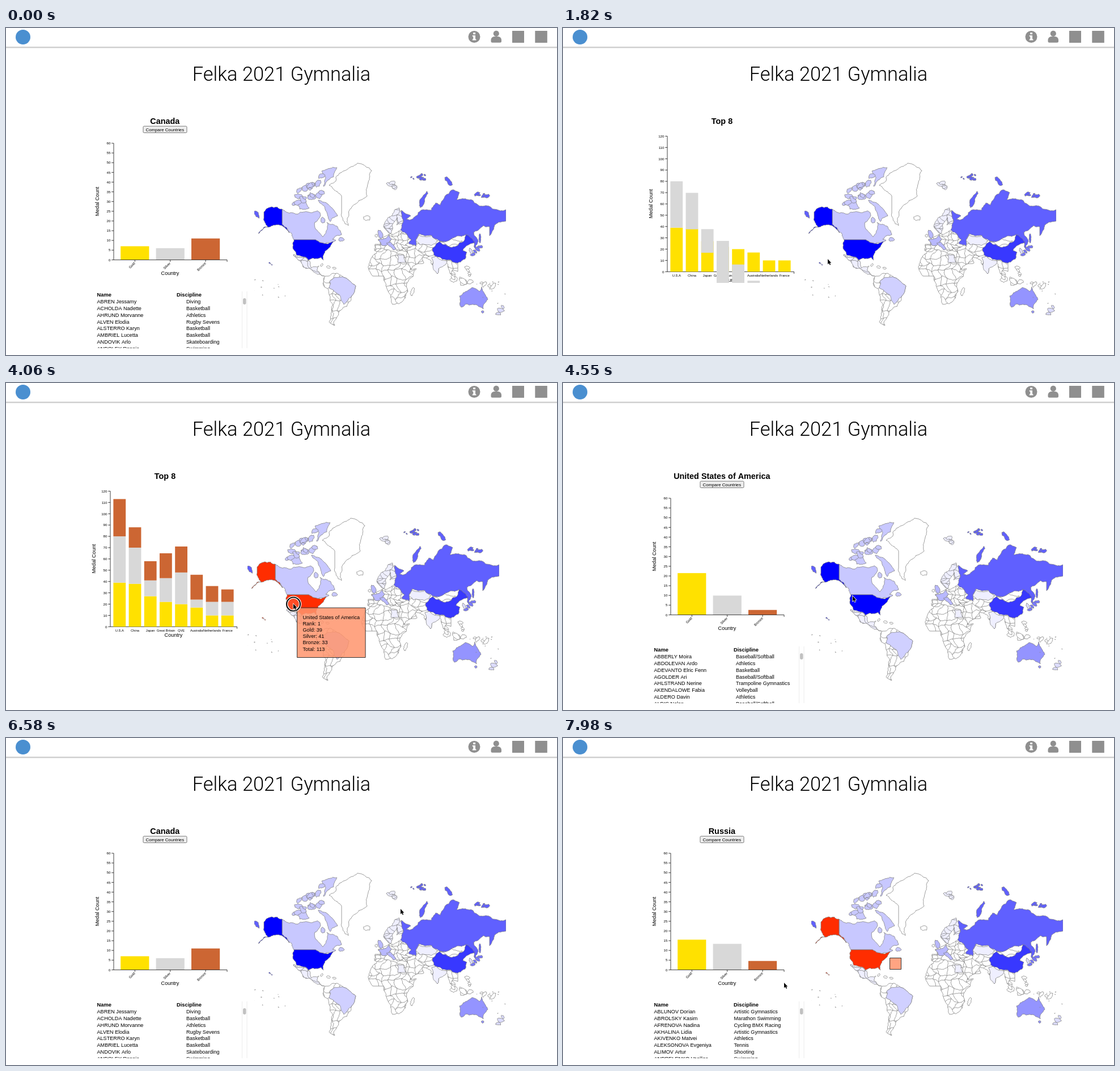
Recreate the animation shown at these times as an HTML page with a canvas. Size 972 by 576 pixels, loop 8 s.

```html
<!DOCTYPE html>
<html lang="en">
<head>
<meta charset="utf-8">
<title>Medal map</title>
<style>
  html, body { margin: 0; width: 100%; height: 100%; overflow: hidden; background: #fff; }
  canvas { display: block; }
</style>
</head>
<body>
<canvas id="stage" width="972" height="576"></canvas>
<script>
const ctx = document.getElementById('stage').getContext('2d');
const LOOP = 8000;
const USA = 'United States of America';
const MEDALS = ['Gold', 'Silver', 'Bronze'];
const COLORS = ['#ffe100', '#d8d8d8', '#cc6633'];
const GREY = '#8f8f8f';
const HOVER = '#ff2d00';

const light = size => `300 ${size}px Roboto, "Liberation Sans", sans-serif`;
const plain = size => `${size}px "Liberation Sans", Arial, sans-serif`;
const bold = size => `bold ${plain(size)}`;
const BODY = plain(9.1);

const clamp = v => Math.max(0, Math.min(1, v));
const ease = v => { const t = clamp(v); return t < .5 ? 4 * t ** 3 : 1 - 4 * (1 - t) ** 3; };
const sum = list => list.reduce((a, b) => a + b, 0);
const noise = (a, b) => { const v = Math.sin(a * 12.9898 + b * 78.233) * 43758.5453; return v - Math.floor(v) - .5; };

// ---------- map ----------
const lands = [];

// Midpoint displacement; shared edges get the same shape, level and upright borders stay straight.
function coast(path, [x1, y1], [x2, y2]) {
  const len = Math.hypot(x2 - x1, y2 - y1);
  if (len < 3 || x1 === x2 || y1 === y2) return path.lineTo(x2, y2);
  const x = (x1 + x2) / 2, y = (y1 + y2) / 2;
  const mid = [x + noise(x, y) * len * .3, y + noise(y, x) * len * .3];
  coast(path, [x1, y1], mid);
  coast(path, mid, [x2, y2]);
}

// A jittered brick lattice stands for the inner borders of a continent.
function lattice(points, step) {
  const path = new Path2D();
  const xs = points.map(p => p[0]), ys = points.map(p => p[1]);
  const left = Math.min(...xs) - step, top = Math.min(...ys) - step;
  const node = (i, j) => [
    left + step * (i + j % 2 / 2 + noise(i + left, j) * .7),
    top + step * (j + noise(j, i + top) * .7),
  ];
  for (let j = 0; top + j * step < Math.max(...ys); j++) {
    for (let i = 0; left + i * step < Math.max(...xs); i++) {
      for (const next of [node(i + 1, j), node(i, j + 1)]) {
        path.moveTo(...node(i, j));
        coast(path, node(i, j), next);
      }
    }
  }
  return path;
}

function land(fill, shape, { country, step } = {}) {
  const points = typeof shape === 'string' ? shape.split(' ').map(p => p.split(',').map(Number)) : shape;
  const path = new Path2D();
  path.moveTo(...points[0]);
  points.forEach((p, i) => coast(path, p, points[(i + 1) % points.length]));
  lands.push({ fill, path, country, inner: step && lattice(points, step) });
}

function island(fill, x, y, rx, ry, tilt = 0, country) {
  const points = Array.from({ length: 7 }, (_, i) => {
    const a = i / 7 * Math.PI * 2, r = 1 + noise(x + i, y) * .5;
    const u = Math.cos(a) * rx * r, v = Math.sin(a) * ry * r;
    return [x + u * Math.cos(tilt) - v * Math.sin(tilt), y + u * Math.sin(tilt) + v * Math.cos(tilt)];
  });
  land(fill, points, { country });
}

function islands(fill, count, [x1, y1], [x2, y2], spread, size, country) {
  for (let i = 0; i < count; i++) {
    const u = (i + .5) / count, r = size * (1 + noise(i, x1));
    island(fill, x1 + (x2 - x1) * u + noise(i, y1) * spread, y1 + (y2 - y1) * u + noise(y2, i) * spread, r, r * .6, noise(i, x2) * 2, country);
  }
}

const PALE = '#efefff', CANADA = '#c8c8ff', RUSSIA = '#6060ff';

land('#fff', '570,277 588,256 620,238 645,251 639,272 637,296 611,314 604,348 592,326 592,296');
island('#fff', 637, 335, 6, 3.5);
islands(PALE, 4, [676, 276], [690, 278], 9, 5);

land(PALE, '507,399 530,405 538,423 552,419 548,427 562,437 545,431 524,421', { step: 14 });
islands('#fff', 3, [552, 417], [584, 424], 2, 4);
land('#fff', '563,437 578,432 594,438 617,455 609,474 589,498 578,518 580,524 570,518 572,474 559,450', { step: 13 });
land('#d0d0ff', '571,446 594,438 617,455 609,474 596,487 588,470 570,458');

land('#fff', '655,393 676,391 702,400 714,426 724,424 708,448 709,464 693,486 682,487 673,462 666,437 648,437 639,422 645,404', { step: 12 });
land(PALE, '690,399 702,400 705,413 691,413');
island('#fff', 717, 465, 3, 9, .3);

land('#fff', '650,392 651,381 661,381 656,373 669,367 695,357 716,374 704,382 720,387 712,394 698,392 690,393 681,380 668,386 660,394', { step: 8 });
land('#b8b8ff', '657,374 675,365 680,372 671,383 662,382');
land('#b8b8ff', '671,379 678,377 688,389 683,391');
land(PALE, '667,352 682,327 694,317 702,342 689,347 690,334 679,362', { step: 12 });
island('#b8b8ff', 660, 364, 4, 8, -.3);
island('#fff', 653, 366, 2.5, 3);

land('#fff', '698,386 726,380 753,387 765,402 783,408 797,414 797,429 787,427 793,442 783,432 777,412 763,424 761,433 750,410 734,404 737,414 714,425 706,402 708,394', { step: 11 });
land(PALE, '722,374 728,364 752,365 762,375 750,383 730,382');
land(PALE, '751,404 760,402 778,411 763,424 761,433 753,416');
land('#fff', '766,376 785,371 805,375 797,382 780,385');
islands('#fff', 6, [784, 440], [818, 452], 9, 6);
islands('#fff', 4, [813, 419], [820, 438], 4, 4);
islands('#fff', 4, [834, 448], [864, 457], 3, 5);

land(RUSSIA, '697,321 714,331 706,337 718,336 727,325 750,321 758,308 766,312 790,285 800,290 795,302 824,304 832,311 882,320 882,340 862,347 853,366 853,350 842,348 825,360 833,376 828,388 826,379 811,364 785,372 764,375 750,365 728,363 723,384 710,379 715,373 696,356 701,341', { country: 'Russia' });
island(RUSSIA, 735, 303, 3.5, 15, .5, 'Russia');
island(RUSSIA, 780, 270, 4, 10, -.6, 'Russia');
island(RUSSIA, 836, 371, 1.5, 9, 0, 'Russia');
island(RUSSIA, 442, 328, 4, 7, -.7, 'Russia');
islands(RUSSIA, 8, [717, 267], [742, 261], 8, 3, 'Russia');
islands(RUSSIA, 4, [829, 294], [848, 297], 4, 4, 'Russia');

land('#3838ff', '753,387 765,376 783,386 797,383 811,364 827,378 806,392 813,395 810,407 797,414 775,408 752,392');
islands('#7878ff', 4, [838, 383], [821, 401], 1, 4.5);
island('#dcdcff', 820, 393, 2.5, 5, -.3);
land('#9494ff', '800,472 822,457 835,464 839,456 850,478 842,495 824,487 803,492');
island('#9494ff', 841, 500, 2.5, 2);
islands('#dcdcff', 3, [878, 488], [867, 506], 1, 4.5);

land(CANADA, '487,319 541,325 550,322 555,330 545,342 546,354 559,368 567,352 566,342 584,349 592,364 576,372 582,374 563,380 546,373 508,373 497,354 487,348', { country: 'Canada' });
land(CANADA, '557,252 584,246 578,262 560,279 564,264', { country: 'Canada' });
land(CANADA, '551,303 568,310 585,331 572,341 567,328', { country: 'Canada' });
land(CANADA, '516,304 528,303 535,317 518,319', { country: 'Canada' });
islands(CANADA, 9, [514, 294], [556, 264], 10, 6, 'Canada');
islands(CANADA, 9, [508, 309], [558, 290], 8, 6, 'Canada');
island(CANADA, 559, 338, 4, 5, 0, 'Canada');
island(CANADA, 591, 373, 5, 3.5, 0, 'Canada');

land('#00f', '508,373 546,373 563,380 577,376 559,402 560,409 556,404 534,409 512,399 506,385', { country: USA });
land('#00f', '487,319 468,315 455,324 455,335 462,350 445,362 472,347 487,348 500,361 487,346', { country: USA });
islands('#00f', 3, [464, 413], [470, 418], 0, 1, USA);
islands('#fff', 10, [445, 455], [492, 470], 30, .6);
islands('#fff', 10, [840, 440], [878, 480], 40, .6);

function drawMap(dx, hovered) {
  ctx.save();
  ctx.translate(dx, 0);
  ctx.beginPath();
  ctx.rect(438, 230, 444, 310);
  ctx.clip();
  ctx.strokeStyle = '#7c7c7c';
  ctx.lineWidth = .75;
  ctx.lineJoin = 'round';
  for (const { fill, path, country, inner } of lands) {
    ctx.fillStyle = country && country === hovered ? HOVER : fill;
    ctx.fill(path);
    ctx.stroke(path);
    if (!inner) continue;
    ctx.save();
    ctx.clip(path);
    ctx.stroke(inner);
    ctx.restore();
  }
  ctx.restore();
}

// ---------- helpers ----------
function text(str, x, y, font, align = 'left', angle = 0) {
  ctx.save();
  ctx.translate(x, y);
  ctx.rotate(angle);
  ctx.font = font;
  ctx.textAlign = align;
  ctx.fillStyle = '#000';
  ctx.fillText(str, 0, 0);
  ctx.restore();
}

function rect(x, y, w, h, fill) {
  ctx.fillStyle = fill;
  ctx.fillRect(x, y, w, h);
}

function box(x, y, w, h, fill, stroke, radius = 0) {
  ctx.beginPath();
  ctx.roundRect(x, y, w, h, radius);
  ctx.fillStyle = fill;
  ctx.fill();
  if (!stroke) return;
  ctx.strokeStyle = stroke;
  ctx.lineWidth = 1;
  ctx.stroke();
}

function disc(x, y, r, fill) {
  ctx.beginPath();
  ctx.arc(x, y, r, 0, 7);
  ctx.fillStyle = fill;
  ctx.fill();
}

function clipped(x, y, w, h, paint) {
  ctx.save();
  ctx.beginPath();
  ctx.rect(x, y, w, h);
  ctx.clip();
  paint();
  ctx.restore();
}

function axes(left, right, top, bottom, max, step) {
  ctx.strokeStyle = '#111';
  ctx.lineWidth = .8;
  ctx.beginPath();
  ctx.moveTo(left, top);
  ctx.lineTo(left, bottom);
  ctx.lineTo(right, bottom);
  ctx.lineTo(right, bottom + 3.5);
  for (let v = 0; v <= max; v += step) {
    const y = bottom - v / max * (bottom - top);
    ctx.moveTo(left - 3.8, y);
    ctx.lineTo(left, y);
    text(v, left - 5.5, y + 2.2, plain(6.2), 'right');
  }
  ctx.stroke();
}

// ---------- pages ----------
const TOP = [
  ['U.S.A', 39, 41, 33], ['China', 38, 32, 18], ['Japan', 27, 14, 17], ['Great Britain', 22, 21, 22],
  ['QVE', 20, 28, 23], ['Australia', 17, 7, 22], ['Netherlands', 10, 12, 14], ['France', 10, 12, 11],
];

function drawTop(time) {
  const unit = 238.8 / 120, base = 429.3, pitch = 27.2, floor = -10;
  text('Top 8', 280.5, 169, bold(14.4), 'center');
  axes(184, 407.5, 190.5, base, 120, 10);
  TOP.forEach(([name], i) => text(name, 200.3 + i * pitch, 438.3, plain(5.8), 'center'));
  text('Country', 295.5, 447, BODY, 'center');
  text('Medal Count', 158, 309.5, BODY, 'center', -Math.PI / 2);
  // Every block rises from below the axis while its height shrinks from the full scale.
  clipped(184, 180, 230, 269, () => MEDALS.forEach((_, m) => TOP.forEach(([, ...counts], i) => {
    const p = ease((time - 312 - m * 861 - i * 100) / 600);
    const top = floor + (sum(counts.slice(0, m + 1)) - floor) * p;
    const height = 120 + (counts[m] - 120) * p;
    rect(189.4 + i * pitch, base - top * unit, 21.8, height * unit, COLORS[m]);
  })));
}

const COUNTRIES = {
  [USA]: {
    rank: 1, medals: [39, 41, 33], column: 305,
    athletes: 'ABBERLY Moira:Baseball/Softball|ABDOLEVAN Ardo:Athletics|ADEVANTO Elric Fenn:Basketball|AGOLDER Ari:Baseball/Softball|AHLSTRAND Nerine:Trampoline Gymnastics|AKENDALOWE Fabia:Volleyball|ALDERO Davin:Athletics|ALDIS Nolan:Baseball/Softball',
  },
  Canada: {
    rank: 11, medals: [7, 6, 11], column: 318,
    athletes: 'ABREN Jessamy:Diving|ACHOLDA Nadette:Basketball|AHRUND Morvanne:Athletics|ALVEN Elodia:Rugby Sevens|ALSTERRO Karyn:Basketball|AMBRIEL Lucetta:Basketball|ANDOVIK Arlo:Skateboarding|ANDOLEY Rennie:Swimming',
  },
  Russia: {
    rank: 5, medals: [20, 28, 23], column: 301.5,
    athletes: 'ABLUNOV Dorian:Artistic Gymnastics|ABROLSKY Kasim:Marathon Swimming|AFRENOVA Nadina:Cycling BMX Racing|AKHALINA Lidia:Artistic Gymnastics|AKIVENKO Matvei:Athletics|ALEKSONOVA Evgeniya:Tennis|ALIMOV Artur:Shooting|ANDRELENKO Vasilisa:Swimming',
  },
};

function drawCountry(name, time, start) {
  const { medals, column, athletes } = COUNTRIES[name];
  const base = 408.4;
  text(name, 280.3, 169, bold(14.4), 'center');
  box(242, 173, 77, 11.5, '#efefef', '#767676', 1.5);
  text('Compare Countries', 280.3, 181.6, plain(7.8), 'center');
  medals.forEach((count, i) => {
    const x = 202.2 + i * 62.4, h = count * 3.425 * ease((time - start - i * 100) / 800);
    rect(x, base - h, 50.2, h, COLORS[i]);
    rect(x + 24.7, base, .8, 3.5, '#111');
    text(MEDALS[i], x + 26, 415, plain(6), 'right', -Math.PI / 4);
  });
  axes(190, 390, 203, base, 60, 5);
  text('Country', 289.5, 435, BODY, 'center');
  text('Medal Count', 163.5, 305.5, BODY, 'center', -Math.PI / 2);

  clipped(150, 460, 280, 104, () => {
    text('Name', 160.5, 473.3, bold(9.3));
    text('Discipline', 301, 473.3, bold(9.3));
    athletes.split('|').forEach((row, i) => {
      const [athlete, discipline] = row.split(':');
      text(athlete, 160.5, 485.2 + i * 11.8, BODY);
      text(discipline, column, 485.2 + i * 11.8, BODY);
    });
    rect(416, 464, 1, 100, '#ebebeb');
    rect(424.5, 464, 1, 100, '#ebebeb');
    box(418, 476, 5.5, 11, '#c1c1c1', null, 2.7);
  });
}

function drawHeader() {
  const shade = ctx.createLinearGradient(0, 33, 0, 36.5);
  shade.addColorStop(0, 'rgba(0,0,0,.27)');
  shade.addColorStop(1, 'rgba(0,0,0,0)');
  rect(0, 33, 972, 4, shade);
  disc(30, 16, 13, '#4a8fd0');
  disc(826, 15.5, 10.5, GREY);
  rect(824.2, 8, 3.8, 3.2, '#fff');
  rect(822.8, 13, 5, 2, '#fff');
  rect(824.2, 13, 3.8, 8, '#fff');
  rect(822.8, 19.6, 6.6, 2, '#fff');
  disc(864.8, 9.8, 5.1, GREY);
  box(855.5, 15, 18.5, 10.8, GREY, null, [6, 6, 2.5, 2.5]);
  rect(893, 5, 21, 21, GREY);
  rect(933.3, 5, 21.5, 21, GREY);
}

// ---------- pointer: [time, x, y] stops, click and hover spans ----------
const MOVES = [
  [350, 95, 63], [1050, 430, 382], [1820, 467, 407], [2660, 467, 402], [3780, 507, 389], [4130, 507, 389],
  [5180, 518, 350], [6160, 518, 350], [6580, 696, 301], [7070, 741, 340], [7480, 741, 340], [7980, 390, 431],
];
const CLICKS = [[3920, 4130], [5390, 5530], [7350, 7480]];
const HOVERS = [[USA, 3640, 4130], ['Canada', 4600, 6300], ['Russia', 6640, 7570], [USA, 7740, LOOP]];

function pointerAt(time) {
  const i = MOVES.findIndex(([at]) => at > time);
  if (i < 0) return MOVES.at(-1).slice(1);
  const [t0, x0, y0] = MOVES[i - 1], [t1, x1, y1] = MOVES[i];
  const u = (time - t0) / (t1 - t0), p = u * u * (3 - 2 * u);
  return [x0 + (x1 - x0) * p, y0 + (y1 - y0) * p];
}

function drawTooltip(lines, x, y) {
  ctx.font = BODY;
  const width = 20 + Math.max(0, ...lines.map(line => ctx.measureText(line).width));
  box(x, y, width, 20 + lines.length * 11.25, 'rgba(255,150,110,.86)', '#333');
  lines.forEach((line, i) => text(line, x + 10, y + 19.5 + i * 11.2, BODY));
}

function drawPointer(time, hover) {
  const [x, y] = pointerAt(time);
  if (hover === HOVERS.at(-1)) drawTooltip([], 576.5, 387.5);
  else if (hover) {
    const { rank, medals } = COUNTRIES[hover[0]];
    const counts = medals.map((n, i) => `${MEDALS[i]}: ${n}`);
    drawTooltip([hover[0], `Rank: ${rank}`, ...counts, `Total: ${sum(medals)}`], x + 6.5, y + 7);
  }
  if (CLICKS.some(([from, to]) => time >= from && time < to)) {
    disc(x, y + .5, 12, 'rgba(255,255,255,.15)');
    for (const [color, width] of [['#fff', 4.5], ['#111', 2.2]]) {
      ctx.strokeStyle = color;
      ctx.lineWidth = width;
      ctx.stroke();
    }
  }
  const arrow = new Path2D('M0,0V9.2L2.1,7.3 3.7,10.6 5.2,9.9 3.7,6.7H6.3Z');
  ctx.save();
  ctx.translate(x, y);
  ctx.strokeStyle = '#fff';
  ctx.lineWidth = 1.4;
  ctx.stroke(arrow);
  ctx.fillStyle = '#000';
  ctx.fill(arrow);
  ctx.restore();
}

// ---------- timeline: [from, country or null for the ranking] ----------
const PAGES = [[-LOOP, 'Canada'], [280, null], [4130, USA], [5530, 'Canada'], [7480, 'Russia']];

function draw(time) {
  const [from, country] = PAGES.findLast(([at]) => time >= at);
  const hover = HOVERS.find(([, start, end]) => time >= start && time < end);
  rect(0, 0, 972, 576, '#fff');
  drawHeader();
  ctx.globalAlpha = country ? 1 : clamp((time - 270) / 950);
  text('Felka 2021 Gymnalia', 486, 93, light(34.4), 'center');
  if (country) drawCountry(country, time, from + 7);
  else drawTop(time);
  drawMap(country ? 0 : -12, hover && hover[0]);
  ctx.globalAlpha = 1;
  if (time >= MOVES[0][0]) drawPointer(time, hover);
}

function tick() {
  draw(performance.now() % LOOP);
  requestAnimationFrame(tick);
}
tick();
</script>
</body>
</html>
```
